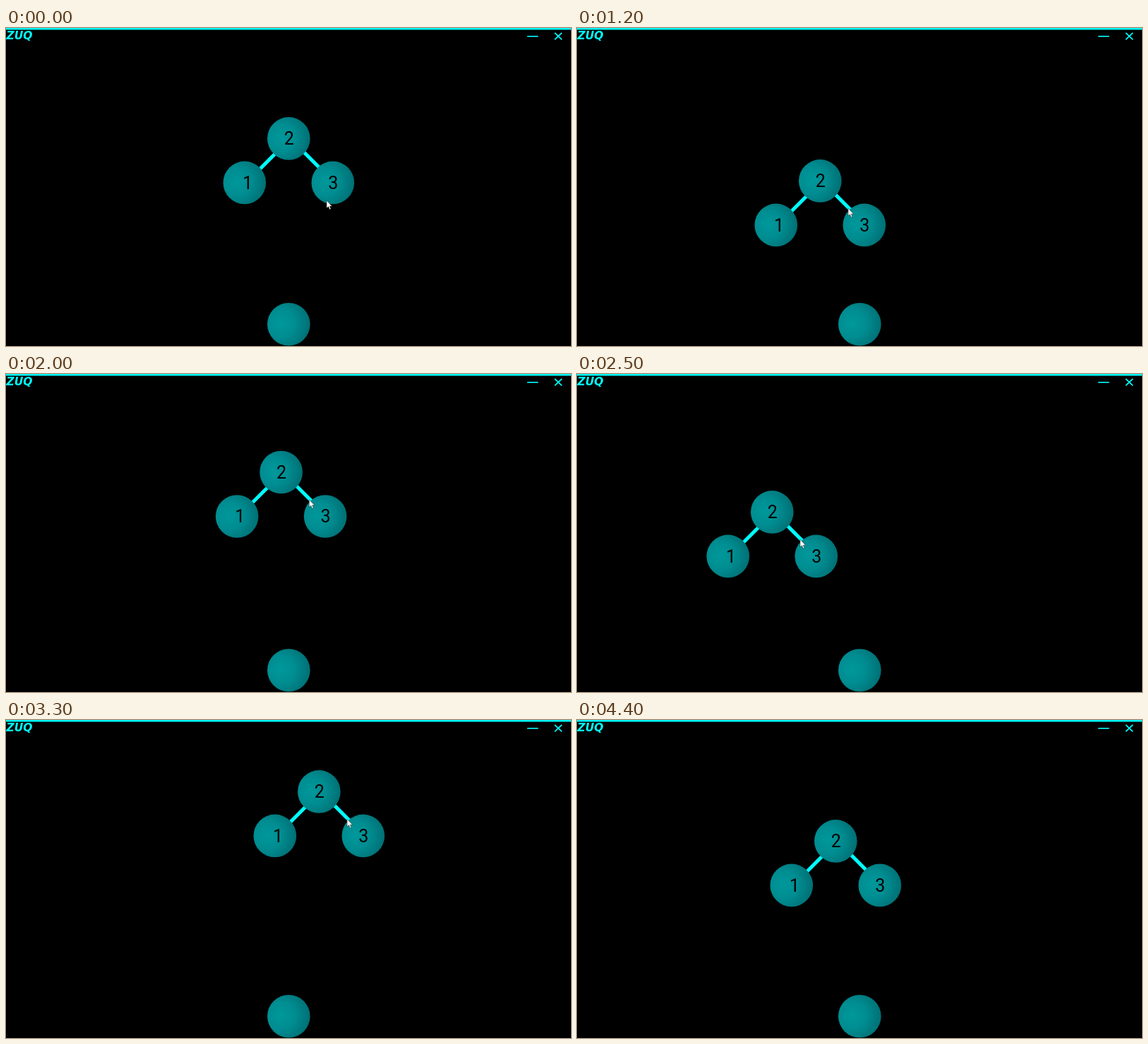
Write an HTML page that moves like this. It is 800x450 px and loops after 5500 ms.

```html
<!DOCTYPE html>
<html lang="en">
<head>
<meta charset="utf-8">
<title>Node drag</title>
<style>
  html, body { margin: 0; width: 100%; height: 100%; overflow: hidden; background: #000; }
  svg { display: block; width: 100%; height: 100%; }
  .node { fill: url(#ball); }
  .digit { font: 25px Roboto, Arial, sans-serif; text-anchor: middle; fill: #000; }
  .title { font: italic bold 15.5px "DejaVu Sans", sans-serif; fill: #0ff; }
  .stroke { fill: none; stroke: #0ff; }
</style>
</head>
<body>
<svg viewBox="0 0 800 450">
  <defs>
    <radialGradient id="ball" cx=".32" cy=".48" r=".72">
      <stop offset="0" stop-color="#00989b"/>
      <stop offset=".45" stop-color="#008d91"/>
      <stop offset="1" stop-color="#006d72"/>
    </radialGradient>
  </defs>
  <rect width="800" height="450"/>
  <rect width="800" height="2.5" fill="#0ff"/>
  <text class="title" x="0.5" y="16.3">ZUQ</text>
  <path class="stroke" stroke-width="1.6" d="M738 11.8H753.5"/>
  <path class="stroke" stroke-width="1.8" d="M777 6.8L787 16.3M787 6.8L777 16.3"/>
  <circle class="node" cx="400.3" cy="419.2" r="30.3"/>
  <g id="tree">
    <path class="stroke" stroke-width="5" d="M-60.2 62.5L2.3 0L64.8 62.5"/>
  </g>
  <path id="cursor" fill="#fff" stroke="#222" stroke-width=".5"
        d="M0 0V10.6L2.5 8.5L4.2 12.6L6 11.8L4.2 8H7.6Z"/>
</svg>
<script>
const LOOP = 5500, STEP = 100, GRAB = [40, 39.2];
const tree = document.getElementById('tree');
const cursor = document.getElementById('cursor');

// Drag path of the top node: [step, x, y]
const path = [
  [6, 400, 156], [9, 346, 167], [12, 344, 216], [14, 400, 238], [15, 431, 233],
  [18, 447, 174], [21, 355, 130], [24, 268, 161], [25, 276, 195], [27, 345, 242],
  [30, 465, 184], [33, 443, 101], [36, 301, 94], [38, 297, 160], [40, 338, 187],
  [42, 366, 171]
];

function add(tag, attrs, text = '') {
  const el = document.createElementNS('http://www.w3.org/2000/svg', tag);
  for (const key in attrs) el.setAttribute(key, attrs[key]);
  el.textContent = text;
  tree.append(el);
}

function addNode(label, x, y, shift) {
  add('circle', { class: 'node', cx: x, cy: y, r: 30.3 });
  add('text', { class: 'digit', x: x + shift, y: y + 9 }, label);
}

addNode('1', -62.5, 62.5, 4.2);
addNode('2', 0, 0, 0.4);
addNode('3', 62.5, 62.5, 0.5);

function slope(i, axis) {
  const a = path[i - 1], b = path[i + 1];
  return a && b ? (b[axis] - a[axis]) / (b[0] - a[0]) : 0;
}

// Cubic Hermite curve through the drag points
function treeAt(step) {
  const s = Math.min(Math.max(step, path[0][0]), path[path.length - 1][0]);
  const i = path.findIndex((p, k) => k > 0 && s <= p[0]) - 1;
  const a = path[i], b = path[i + 1];
  const span = b[0] - a[0], u = (s - a[0]) / span, v = 1 - u;
  return [1, 2].map(k =>
    a[k] * v * v * (1 + 2 * u) + b[k] * u * u * (3 - 2 * u) +
    span * u * v * (slope(i, k) * v - slope(i + 1, k) * u));
}

function place(el, x, y) {
  el.setAttribute('transform', `translate(${x.toFixed(2)} ${y.toFixed(2)})`);
}

function draw(ms) {
  const step = Math.floor((ms % LOOP) / STEP);
  const [x, y] = treeAt(step);
  const approach = Math.max(0, 1 - step / 5);
  const leave = step > 42 ? 1 : 0;
  place(tree, x + 0.3, y + 0.4);
  place(cursor, x + GRAB[0] + 14 * approach + 30 * leave,
                y + GRAB[1] + 49 * approach + 7 * leave);
  cursor.setAttribute('visibility', step < 44 ? 'visible' : 'hidden');
}

const start = performance.now();
function tick() {
  draw(performance.now() - start);
  requestAnimationFrame(tick);
}
tick();
</script>
</body>
</html>
```
